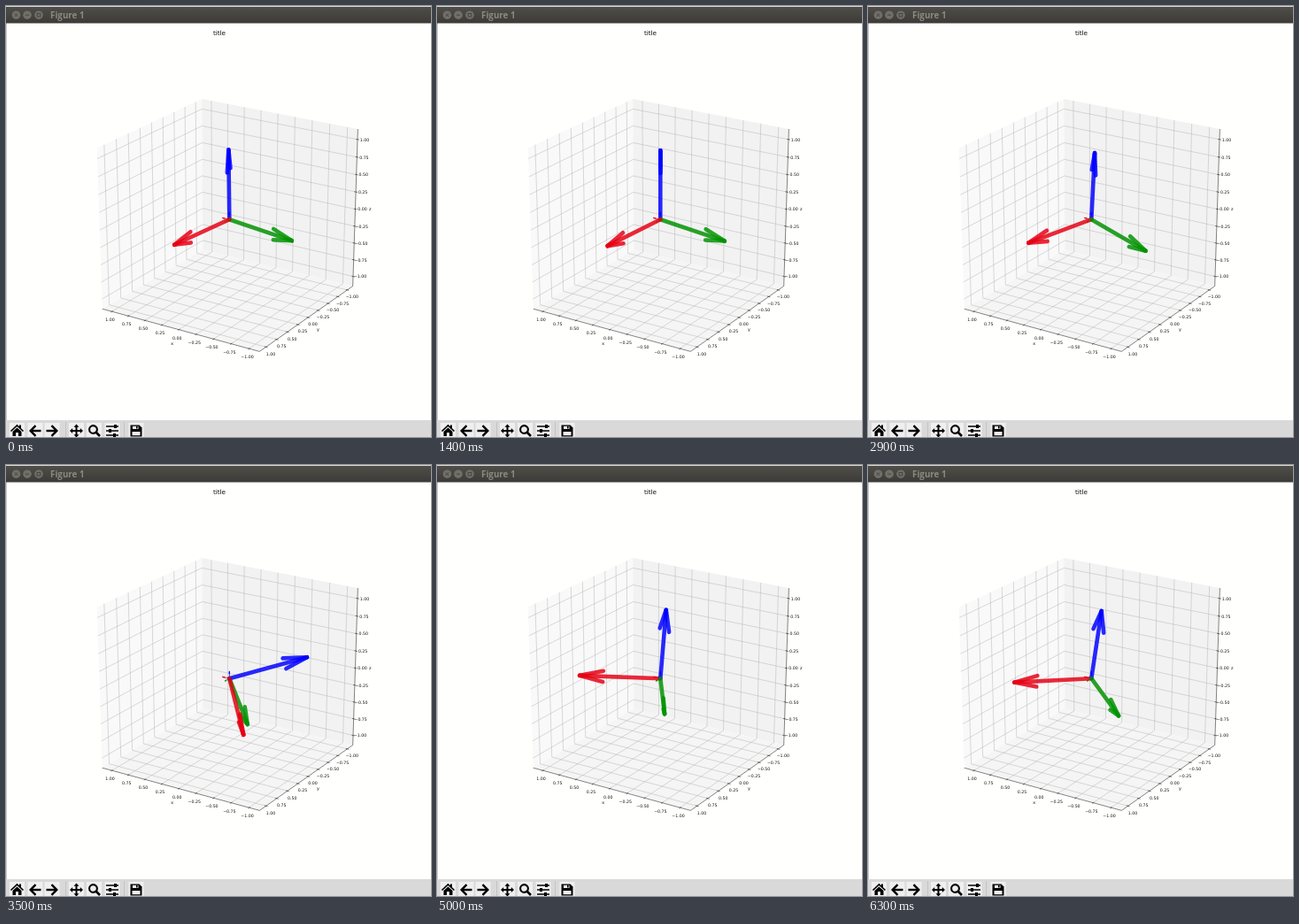
Write an HTML page with a canvas that moves like this. It is 480 px wide and 487 px high and loops after 8000 ms.

```html
<!DOCTYPE html>
<html>
<head>
<meta charset="utf-8">
<style>
html, body { margin: 0; width: 100%; height: 100%; overflow: hidden; background: #fffffd; }
canvas { display: block; }
</style>
</head>
<body>
<canvas id="stage" width="480" height="487"></canvas>
<script>
const ctx = document.getElementById('stage').getContext('2d');
const LOOP = 8000, STEP = 100, HALF = 1.146, SCALE = 1 / 2.2;
const COLORS = ['#e60014', '#009200', '#0000ff'];
const BASIS = [[1, 0, 0], [0, 1, 0], [0, 0, 1]];

const rad = degrees => degrees * Math.PI / 180;
const wave = degrees => [Math.cos(rad(degrees)), Math.sin(rad(degrees))];
const [ca, sa] = wave(122.3), [ce, se] = wave(23);

// Hand-held sensor: time, then yaw, pitch and roll in degrees.
const POSES = [
  [0, 81, 2, -1],
  [1500, 83, 2.4, -2],
  [2300, 114, -14.5, -83],
  [2900, 73, 3, -7],
  [3500, 133, 24, -72],
  [3700, 134, 60, -72],
  [4400, 35, 15, -16],
  [4700, 51, -3, -5],
  [5600, -9, -6, -1],
  [6300, 52, -5, -7]
];

const combine = (a, p, b, q) => a.map((v, i) => v * p + b[i] * q);
const cross = (a, b) => [a[1] * b[2] - a[2] * b[1], a[2] * b[0] - a[0] * b[2], a[0] * b[1] - a[1] * b[0]];
const unit = a => { const n = Math.hypot(...a) || 1; return a.map(v => v / n); };

const depth = ([x, y, z]) => ce * (ca * x + sa * y) + se * z;
function project(p) {
  const [x, y, z] = p;
  const w = SCALE / (10 - SCALE * depth(p));
  const right = ca * y - sa * x;
  const up = ce * z - se * (ca * x + sa * y);
  return [252.3 + 2008 * right * w, 241.2 - 1872 * up * w];
}

function trace(points) {
  ctx.beginPath();
  points.forEach(p => ctx.lineTo(...p));
}
function line(points, color, width) {
  trace(points);
  ctx.strokeStyle = color;
  ctx.lineWidth = width;
  ctx.stroke();
}
function fill(points, color) {
  trace(points);
  ctx.fillStyle = color;
  ctx.fill();
}
function box(x, y, w, h, color) {
  ctx.fillStyle = color;
  ctx.fillRect(x, y, w, h);
}
function label(text, [x, y], size, [dx, dy] = [0, 0]) {
  ctx.font = size + 'px "DejaVu Sans", sans-serif';
  ctx.textAlign = 'center';
  ctx.textBaseline = 'alphabetic';
  ctx.fillStyle = '#111';
  ctx.fillText(text, x + dx, y + dy + size * 0.36);
}

function drawAxes() {
  const H = HALF;
  const ticks = Array.from({ length: 9 }, (_, i) => 1 - i / 4);

  // A pane is the square on the box side where one coordinate is fixed.
  ['#f9f9f9', '#f2f2f2', '#f5f5f5'].forEach((color, axis) => {
    const corner = (a, b) => {
      const p = [a, b];
      p.splice(axis, 0, axis ? -H : H);
      return project(p);
    };
    fill([corner(-H, -H), corner(H, -H), corner(H, H), corner(-H, H)], color);
  });

  for (const t of ticks) {
    const grid = points => line(points.map(project), '#b4b4b4', 0.5);
    grid([[t, H, -H], [t, -H, -H], [t, -H, H]]);
    grid([[-H, t, -H], [H, t, -H], [H, t, H]]);
    grid([[H, H, t], [H, -H, t], [-H, -H, t]]);
  }
  line([[H, H, -H], [-H, H, -H], [-H, -H, -H], [-H, -H, H]].map(project), '#333', 0.6);

  const axes = [
    { name: 'x', at: (t, k = 1) => [t, H * k, -H], tick: [-2, 9.3], title: [-7.5, 15.7] },
    { name: 'y', at: (t, k = 1) => [-H * k, t, -H], tick: [5.4, 7.6], title: [11.3, 13.7] },
    { name: 'z', at: (t, k = 1) => [-H * k, -H, t], tick: [8, 0.2], title: [16.8, -0.7] }
  ];
  for (const { name, at, tick, title } of axes) {
    for (const t of ticks) {
      line([at(t, 0.982), at(t, 1.02)].map(project), '#222', 0.6);
      label(t.toFixed(2).replace('-', '\u2212'), project(at(t)), 4.7, tick);
    }
    label(name, project(at(0)), 4.8, title);
  }
}

function arrow(dir, length, color, width) {
  const tip = dir.map(v => v * length);
  const side = cross(unit(cross(dir, BASIS[2])), dir);
  line([project([0, 0, 0]), project(tip)], color, width);
  for (const angle of [-15, 15]) {
    const [c, s] = wave(angle);
    const barb = combine(tip, 1, combine(dir, c, side, s), -0.3 * length);
    line([project(tip), project(barb)], color, width);
  }
}

function poseAt(t) {
  const next = POSES.findIndex(p => p[0] > t);
  const to = POSES.at(next), from = next < 0 ? to : POSES[next - 1];
  const u = to === from ? 0 : (t - from[0]) / (to[0] - from[0]);
  const ease = u * u * (3 - 2 * u);
  const [, yaw, pitch, roll] = combine(from, 1 - ease, to, ease);

  const [cy, sy] = wave(yaw), [cp, sp] = wave(pitch), [cr, sr] = wave(roll);
  const side = [-sy, cy, 0], top = [cy * sp, sy * sp, cp];
  return [
    [cy * cp, sy * cp, -sp],
    combine(side, cr, top, sr),
    combine(top, cr, side, -sr)
  ];
}

function drawArrows(t) {
  ctx.lineCap = 'round';
  BASIS.forEach((dir, i) => arrow(dir, 0.1, COLORS[i], 0.8));
  ctx.globalAlpha = 0.84;
  poseAt(t).map((dir, i) => ({ dir, color: COLORS[i] }))
    .sort((a, b) => depth(a.dir) - depth(b.dir))
    .forEach(a => arrow(a.dir, 1, a.color, 4.6));
  ctx.globalAlpha = 1;
  ctx.lineCap = 'butt';
}

function drawTitleBar() {
  const shade = ctx.createLinearGradient(0, 0, 0, 19);
  shade.addColorStop(0, '#504f4a');
  shade.addColorStop(1, '#3c3b37');
  box(0, 0, 480, 19.5, shade);
  box(0, 0, 480, 1, '#dcdcd8');
  const ink = '#45443f';
  for (const x of [11.5, 24, 37]) {
    ctx.beginPath();
    ctx.arc(x, 10.2, 4.8, 0, 7);
    ctx.fillStyle = '#716f68';
    ctx.fill();
  }
  line([[9.8, 8.5], [13.2, 11.9]], ink, 1);
  line([[13.2, 8.5], [9.8, 11.9]], ink, 1);
  line([[22, 10.2], [26, 10.2]], ink, 1);
  ctx.strokeRect(35.2, 8.4, 3.6, 3.6);
  ctx.font = 'bold 9.8px "Open Sans", sans-serif';
  ctx.textAlign = 'left';
  ctx.fillStyle = '#8c897f';
  ctx.fillText('Figure 1', 50, 14);
}

// Icons are drawn around their own centre.
const ICONS = [
  [12.5, ink => {
    line([[-7, 0.5], [0, -6], [7, 0.5]], ink, 1.7);
    fill([[-5, 1], [0, -3.5], [5, 1], [5, 6], [1.5, 6], [1.5, 2], [-1.5, 2], [-1.5, 6], [-5, 6]], ink);
    box(2.5, -6.5, 2, 4, ink);
  }],
  [33, ink => backArrow(ink, 1)],
  [52, ink => backArrow(ink, -1)],
  [79.5, ink => {
    for (let i = 0; i < 4; i++) {
      line([[0, 0], [5, 0]], ink, 2);
      fill([[7.5, 0], [4.3, 3], [4.3, -3]], ink);
      ctx.rotate(Math.PI / 2);
    }
  }],
  [99.5, ink => {
    line([[2, 1.5], [6.5, 6]], ink, 2.6);
    ctx.beginPath();
    ctx.arc(-1, -1.5, 4.4, 0, 7);
    ctx.lineWidth = 2.1;
    ctx.stroke();
  }],
  [120, ink => [2, -4, 1].forEach((x, i) => {
    line([[-7, i * 5 - 5], [7, i * 5 - 5]], ink, 1.5);
    box(x, i * 5 - 7, 3, 4, ink);
  })],
  [147, (ink, paper) => {
    fill([[-6.5, -6.5], [3.5, -6.5], [6.5, -3.5], [6.5, 6.5], [-6.5, 6.5]], ink);
    box(-4, -5.2, 6.5, 3.2, paper);
    box(0, -5.2, 1.6, 2.7, ink);
    box(-4.5, 1, 9, 4.2, paper);
  }]
];
function backArrow(ink, s) {
  line([[6.5 * s, 0], [-5 * s, 0]], ink, 2.4);
  line([[0.5 * s, -5.8], [-5.3 * s, 0], [0.5 * s, 5.8]], ink, 2.4);
}

function drawToolbar() {
  box(0, 468, 480, 19, '#d9d9d9');
  for (const x of [67, 133]) box(x, 470, 1, 17, '#c3c3c3');
  for (const [x, draw] of ICONS) {
    ctx.save();
    ctx.translate(x, 480);
    box(-8.5, -9, 17, 17, '#efefef');
    draw('#000', '#efefef');
    ctx.restore();
  }
}

function frame(now) {
  const t = Math.floor(now % LOOP / STEP) * STEP;
  box(0, 0, 480, 487, '#fffffd');
  box(0, 19, 1, 449, '#c6c6c4');
  label('title', [241, 30.3], 7.2);
  drawTitleBar();
  drawAxes();
  drawArrows(t);
  drawToolbar();
  requestAnimationFrame(frame);
}
requestAnimationFrame(frame);
</script>
</body>
</html>
```
